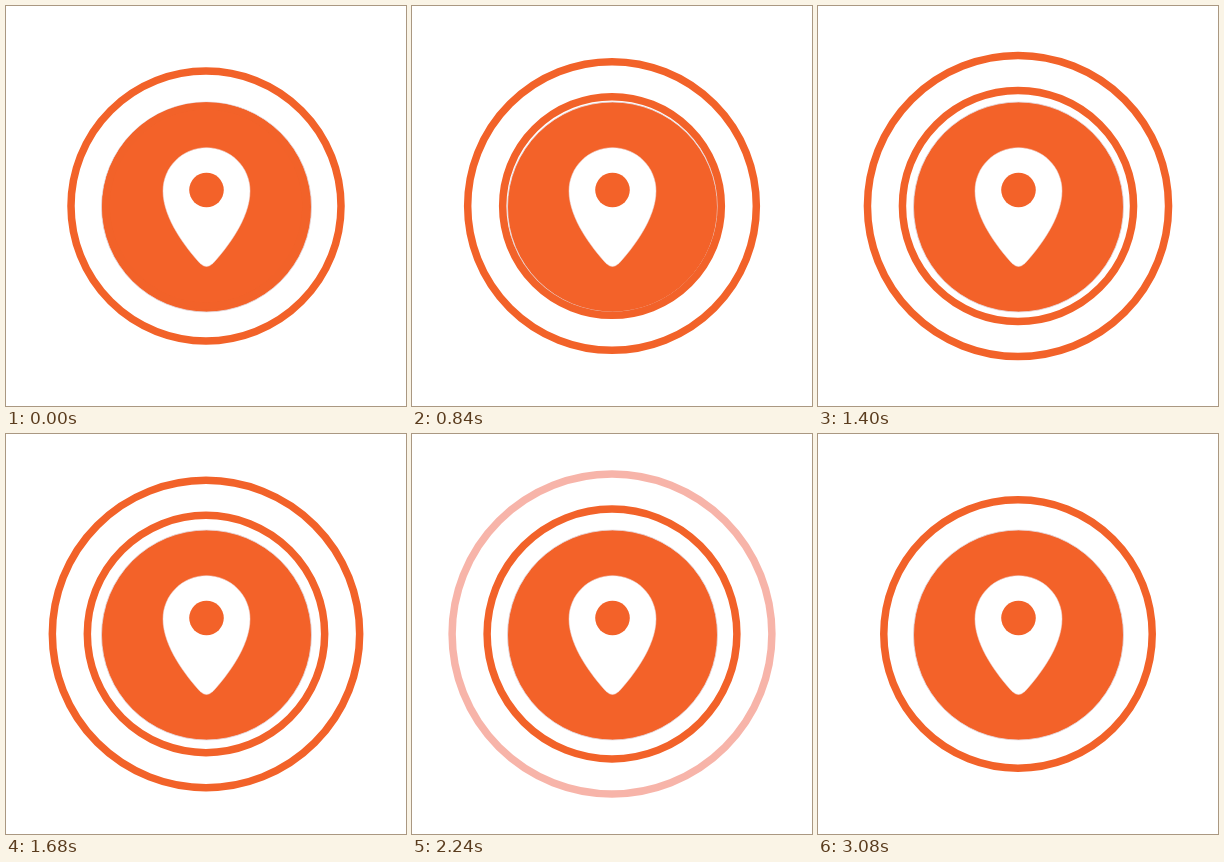
Write an HTML page that moves like this. It is 400 px wide and 400 px high and loops after 3150 ms.

```html
<!DOCTYPE html>
<html lang="en">
<head>
<meta charset="utf-8">
<title>Pulsing map pin</title>
<style>
html, body { margin: 0; height: 100%; overflow: hidden; background: #fff; }
svg { display: block; width: 100%; height: 100%; }
</style>
</head>
<body>
<svg viewBox="0 0 400 400">
  <circle cx="200.5" cy="201" r="105" fill="#f36229" stroke="#e3dbe2" stroke-width=".8"/>
  <g fill="none" stroke-width="7.5">
    <circle id="inner" cx="200" cy="200" stroke="#f26229"/>
    <circle id="outer" cx="200" cy="200"/>
  </g>
  <path fill="#fff" stroke="#eddfe0" stroke-width=".5" d="M200.5 141.7C176.5 141.7 157 161 157 185C157 213 181 243 194 257.3Q200.5 263.5 207 257.3C220 243 244 213 244 185C244 161 224.5 141.7 200.5 141.7Z"/>
  <circle cx="200.5" cy="184" r="17.3" fill="#f36229"/>
</svg>
<script>
const LOOP = 3150, STEP = 70, GROWTH = 35;
const inner = document.getElementById('inner');
const outer = document.getElementById('outer');
const start = performance.now();

function draw() {
  const elapsed = (performance.now() - start) % LOOP;
  const t = Math.floor(elapsed / STEP) * STEP;
  const r = 100 + GROWTH * t / LOOP;
  const fading = t > 1700;
  inner.setAttribute('r', r);
  outer.setAttribute('r', r + GROWTH);
  outer.setAttribute('stroke', fading ? '#ed5a40' : '#f26229');
  outer.setAttribute('opacity', fading ? Math.max(0, 1 - (t - 1470) / 1400) : 1);
  requestAnimationFrame(draw);
}
draw();
</script>
</body>
</html>
```
